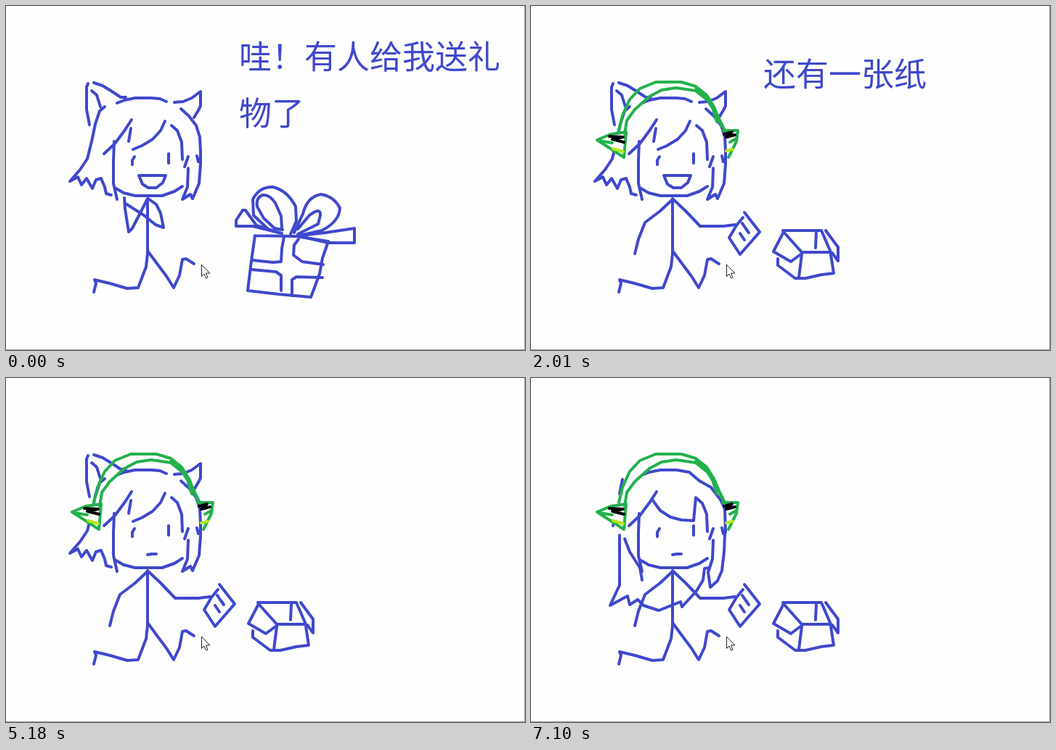
Write an HTML page with a canvas that moves like this. It is 715 px wide and 475 px high and loops after 8 s.

```html
<!DOCTYPE html>
<html lang="zh-CN">
<head>
<meta charset="utf-8">
<title>Gift doodle</title>
<style>
html, body { margin: 0; width: 100%; height: 100%; overflow: hidden; background: #fefefe; }
canvas { display: block; }
</style>
</head>
<body>
<canvas id="stage" width="715" height="475"></canvas>
<script>
const ctx = document.getElementById('stage').getContext('2d');
const BLUE = '#3f48cc', GREEN = '#22b14c', LIME = '#b5e61d', BLACK = '#000';
const LOOP = 8000;

function pen(color, d, width = 4) {
  ctx.strokeStyle = color;
  ctx.lineWidth = width;
  ctx.stroke(new Path2D(d));
}

function write(x, y, ...lines) {
  ctx.fillStyle = BLUE;
  lines.forEach((line, i) => ctx.fillText(line, x, y + i * 78));
}

// Girl
function face() {
  pen(BLUE, 'M149 187L148 213V245L153 267M150 251L162 258L178 262H215L232 256L243 249');
  pen(BLUE, 'M177 208L174 213V219M224 204V217M251 208L246 222M263 207L265 215');
}

function legs() {
  pen(BLUE, 'M195 266V342L193 360L182 389L167 390L143 383L122 378L124 383L121 395');
  pen(BLUE, 'M195 338L212 361L221 373L231 389L239 372L243 350L248 349L259 356');
}

function shortHair() {
  pen(BLUE, 'M121 106L133 110L146 118L158 126H165M113 107L111 112V143L115 164M118 117L125 123L130 139');
  pen(BLUE, 'M136 139L129 145L123 163L118 187L112 211L102 226L88 242L99 236L104 247L111 238L119 252L124 240L131 238L136 250L138 259L145 261');
  pen(BLUE, 'M153 134L163 130L178 127H200L212 128L221 132M232 133L244 132L256 127L268 118V138L265 144L259 154');
  pen(BLUE, 'M241 142L252 152L262 165L267 181L268 200V218L266 245L257 266L254 260L243 267L250 250L251 224');
  pen(BLUE, 'M173 157L164 171L150 190L135 204M172 169L169 187M219 159L213 172L202 184L187 193L175 198M228 165L236 172L242 188L243 212');
}

function longHair() {
  pen(BLUE, 'M153 134L163 130L178 127H200L218 130L232 142L248 151L261 168L267 181L268 213');
  pen(BLUE, 'M126 140L122 160M113 204L118 187');
  pen(BLUE, 'M173 157L164 171L150 190L135 204M167 168L178 183L192 192L207 196L224 197L227 165L236 173L242 188L243 212');
  pen(BLUE, 'M122 217V286L109 314L133 301L136 313L147 306L155 314L176 321L206 309L208 316L228 294L237 279L239 263L246 262');
  pen(BLUE, 'M129 222L136 240L150 262L153 279M267 215L266 240L263 266L257 280L247 289L244 268L250 250L251 224');
}

function smile() {
  pen(BLUE, 'M183 234H220L216 244L207 251H196L188 246Z');
}

function flatMouth() {
  pen(BLUE, 'M195 244L201 243H207');
}

function foldedArms() {
  pen(BLUE, 'M163 265L164 280L169 312L174 307L194 268M196 266L207 274L213 286L217 306L206 302L190 289L165 273');
}

function openArms() {
  pen(BLUE, 'M195 267L178 283L157 299L148 322L143 342M196 267L213 283L233 304H265L281 302');
}

// Props
function note() {
  pen(BLUE, 'M294 285L315 312L288 343L273 320L283 303L292 292M291 300L295 306L300 313M288 314L294 323');
}

function emptyBox() {
  pen(BLUE, 'M348 312L347 310H400L413 340H373L348 312L334 339L358 353L374 341M373 343L369 375');
  pen(BLUE, 'M340 349V358L364 376L378 376L400 371L417 369L413 343M393 313L392 334M406 310L423 333V352L415 341');
}

function gift() {
  pen(BLUE, 'M343 317L338 352L333 393L376 398L420 402L432 370L436 348L444 325L400 318L343 317');
  pen(BLUE, 'M360 307L341 289L340 267Q349 249 368 250Q388 255 399 277L400 297L392 315');
  pen(BLUE, 'M380 307L379 290L371 272Q363 260 354 261Q344 264 346 277L355 293L370 307L381 309');
  pen(BLUE, 'M397 313L409 287Q415 263 434 260Q452 263 460 279Q459 298 435 310L400 318M402 308L418 289Q434 277 433 289L430 301L402 315');
  pen(BLUE, 'M380 314L345 303L330 282H326L317 296V304L340 304L380 314M405 317L440 313L480 307V327H444L405 318');
  pen(BLUE, 'M340 351L368 354L379 353L380 335L383 319M339 364L372 367L379 372V393');
  pen(BLUE, 'M403 322L397 330L396 344L408 353L437 357M394 400V378L400 374L436 375');
}

function wornHeadset() {
  ctx.fillStyle = '#fefefe';
  ctx.fill(new Path2D('M131 174L91 185L128 209Z'));
  pen(GREEN, 'M121 172L126 151L136 129L150 114L172 105H207L227 111L242 123L252 139L263 166');
  pen(GREEN, 'M129 177L132 158L143 143L163 125L180 116L200 113L227 117L243 130L257 152L267 172M227 115L247 131L256 160');
  pen(GREEN, 'M131 174L110 177L91 185L128 209L131 175M93 186L112 189');
  pen(GREEN, 'M264 172H285L283 187L272 209M274 188L283 183');
  pen(LIME, 'M113 197L127 201M269 200L278 198');
  pen(BLACK, 'M108 180L127 181L112 184L128 188M266 177L277 174L269 181L281 178');
}

function bigHeadset() {
  pen(GREEN, 'M280 236V219L291 194L303 172L314 155Q330 138 354 131L372 127H404L440 135L474 149L497 168L510 186L522 222L523 259');
  pen(GREEN, 'M271 324L269 291L277 261L287 235L301 207L330 176L350 164L385 153H404L438 160L459 173L478 187L494 208L505 234L513 267L516 300L518 334');
  pen(GREEN, 'M287 236L262 238L227 249L203 262L234 291L265 323M203 261L240 261L272 267');
  pen(GREEN, 'M515 261L555 264L587 270L553 305L519 334M519 289L545 280L586 271');
  pen(LIME, 'M207 267L222 271L236 279L252 293L267 296L228 288L254 304L264 314L246 291');
  pen(LIME, 'M517 317L563 281L545 302L523 323M535 306L561 284');
  pen(BLACK, 'M215 255L241 252L281 240L245 254L281 246L256 257L275 259M265 246L279 241');
  pen(BLACK, 'M515 263L568 266L524 271L568 272L545 274L519 281M540 268L568 269');
}

function hand() {
  pen(BLUE, 'M580 307L606 308L633 320L650 341L656 362L654 388L643 406L625 419L590 429L563 425L545 408L533 385L529 368L531 345L543 327L562 313Z');
  pen(BLUE, 'M658 384L687 414L715 448M585 432L586 455L590 475');
  pen(BLUE, 'M590 439L625 425L655 397L640 420L597 454L645 437L689 418L668 434L600 463L590 473L694 440L618 472L695 450L640 475L699 457L665 475L703 464L690 475');
}

function sheet() {
  pen(BLUE, 'M139 170L161 167L190 166L200 164H238L290 169L325 171L360 173L405 179L435 180L455 182H555L605 185L612 188H624V225L618 280L610 325L599 365L594 390V415L597 440V475');
  pen(BLUE, 'M139 170V318L132 345L130 368L125 392V440L124 475');
}

function girlWithNote(...parts) {
  [...parts, face, legs, openArms, wornHeadset, note, emptyBox].forEach(part => part());
}

const scenes = [
  [0, () => {
    [shortHair, face, smile, legs, foldedArms, gift].forEach(part => part());
    write(321, 87, '哇！有人给我送礼', '物了');
  }],
  [500, () => {
    bigHeadset();
    hand();
    write(151, 92, '苏芮朵娜的耳机');
  }],
  [1890, () => {
    girlWithNote(shortHair, smile);
    write(320, 111, '还有一张纸');
  }],
  [3410, () => {
    sheet();
    write(184, 277, '从今天起，你就是', '苏芮朵娜了');
  }],
  [5180, () => girlWithNote(shortHair, flatMouth)],
  [6980, () => girlWithNote(longHair, flatMouth)]
];

function pointer() {
  const arrow = new Path2D('M269.5 357.5V373.5L273 370L275.5 376L278 375L275.5 369H280.5Z');
  ctx.fillStyle = '#fff';
  ctx.fill(arrow);
  ctx.strokeStyle = '#222';
  ctx.lineWidth = 1;
  ctx.stroke(arrow);
}

function edges() {
  ctx.fillStyle = '#a0a0a0';
  ctx.fillRect(714, 0, 1, 475);
  ctx.fillRect(0, 474, 715, 1);
}

function draw(t) {
  ctx.fillStyle = '#fefefe';
  ctx.fillRect(0, 0, 715, 475);
  ctx.lineCap = ctx.lineJoin = 'round';
  ctx.font = '45px "Noto Sans CJK SC", "Noto Sans CJK", sans-serif';
  scenes.filter(([start]) => start <= t).pop()[1]();
  pointer();
  edges();
}

const begin = performance.now();
function tick() {
  draw((performance.now() - begin) % LOOP);
  requestAnimationFrame(tick);
}
tick();
</script>
</body>
</html>
```
